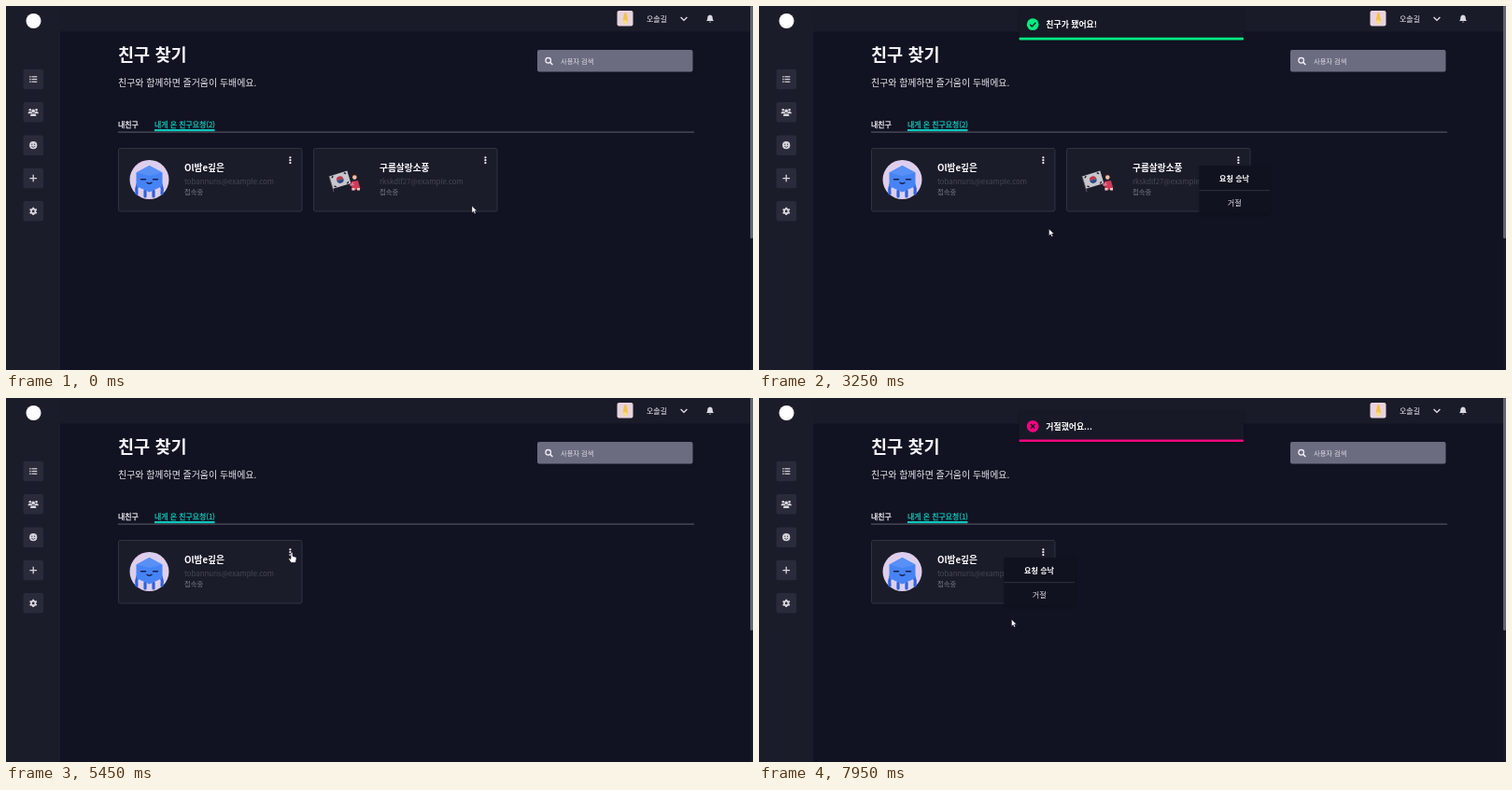
Recreate the animation shown at these times as an HTML page. Size 800x390 px, loop 8 s.

```html
<!DOCTYPE html>
<html lang="ko">
<head>
<meta charset="utf-8">
<title>친구 찾기</title>
<style>
html, body { margin: 0; width: 100%; height: 100%; overflow: hidden; background: #111322; }
svg { display: block; width: 100vw; height: 100vh; }
text { font-family: "Noto Sans CJK KR", "Noto Sans CJK", "Noto Sans CJK JP", sans-serif; white-space: pre; }
.medium { stroke: currentColor; stroke-width: .25; }
</style>
</head>
<body>
<svg id="stage" viewBox="0 0 800 390" xmlns="http://www.w3.org/2000/svg"></svg>
<script>
const LOOP = 8000;
const WHITE = '#f4f4f8', TEAL = '#10c6ba';

const text = (x, y, size, str, fill = WHITE, weight = 400, extra = '') =>
  `<text x="${x}" y="${y}" font-size="${size}" fill="${fill}" color="${fill}" font-weight="${weight}" ${extra}>${str}</text>`;
const rect = (x, y, w, h, fill, r = 0, extra = '') =>
  `<rect x="${x}" y="${y}" width="${w}" height="${h}" rx="${r}" fill="${fill}" ${extra}/>`;
const circle = (x, y, r, fill, extra = '') => `<circle cx="${x}" cy="${y}" r="${r}" fill="${fill}" ${extra}/>`;
const path = (d, fill, extra = '') => `<path d="${d}" fill="${fill}" ${extra}/>`;
const line = (d, stroke, width, extra = '') =>
  `<path d="${d}" fill="none" stroke="${stroke}" stroke-width="${width}" ${extra}/>`;
const at = (x, y, body, id = '') => `<g ${id && `id="${id}"`} transform="translate(${x} ${y})">${body}</g>`;

// Sidebar icons, drawn around their centre
const ICON = '#d6d6dc', TILE = '#2a2b3a';
const person = (x, y, r) =>
  circle(x, y, r, ICON) + path(`M${x - r * 1.7} ${y + r * 3}v-.6q0-${r * 1.2} ${r * 1.7}-${r * 1.2}t${r * 1.7} ${r * 1.2}v.6z`, ICON);
const icons = [
  [-2.7, 0, 2.7].map(y => rect(-4, y - .7, 1.4, 1.4, ICON) + rect(-1.7, y - .6, 5.8, 1.2, ICON)).join(''),
  person(-3.4, -2.6, 1.3) + person(3.4, -2.6, 1.3) + person(0, -1.4, 1.85),
  circle(0, 0, 4.1, ICON) + circle(-1.4, -1, .6, TILE) + circle(1.4, -1, .6, TILE) +
    line('M-2 1.1Q0 3.3 2 1.1', TILE, .8),
  line('M-3.8 0H3.8M0-3.8V3.8', ICON, 1.3),
  [0, 60, 120].map(a => rect(-1, -4.2, 2, 8.4, ICON, .4, `transform="rotate(${a})"`)).join('') +
    circle(0, 0, 3.1, ICON) + circle(0, 0, 1.3, TILE)
];
const sidebar = rect(0, 0, 58, 390, '#1b1c2a') + circle(29.5, 16, 8, '#fff') +
  icons.map((icon, i) => {
    const y = 78.5 + i * 35.35;
    return rect(18.5, y - 10.8, 21.5, 21.5, TILE, 2) + at(29.2, y, icon);
  }).join('');

const header = rect(58, 0, 742, 27.5, '#1a1b29') +
  rect(654.5, 5, 17, 16.5, '#e9d3df', 2) +
  path('M662 8q1.5-2 2.6 0l1.5 8q-2.6 4-5.4 0z', '#f4c24c') + circle(663.3, 17.3, 2.4, '#f7dc8b') +
  text(686, 16.6, 8, '오솔길') +
  line('M722.6 12L726 15.4L729.4 12', '#e4e4ea', 1.3) +
  path('M750 16.1q1.3-1.2 1.3-3.3q0-2.7 2.7-3.2q2.7.5 2.7 3.2q0 2.1 1.3 3.3zM752.9 16.7h2.2q-1.1 1.7-2.2 0z', '#d9d9df');

const content = text(120, 58.6, 18.6, '친구 찾기', WHITE, 700) +
  text(120, 86, 9.95, '친구와 함께하면 즐거움이 두배에요.', '#e6e6ec') +
  rect(569, 47, 166.5, 23.5, '#6b6c80', 2) +
  circle(580.7, 58.3, 2.8, 'none', 'stroke="#ececf2" stroke-width="1.3"') +
  line('M582.8 60.4L585.4 63', '#ececf2', 1.5) +
  text(594, 61.8, 7.25, '사용자 검색', '#dcdce4') +
  rect(120, 134.6, 617, 1, '#5f616d') +
  text(120, 130, 7.95, '내친구', WHITE, 400, 'class="medium"') +
  text(159, 130, 7.9, '', TEAL, 400, 'id="tab" class="medium"') +
  rect(159, 132, 64.5, 2.2, TEAL) +
  rect(797, 0, 3, 390, '#171827') + rect(797, 0, 3, 249, '#646573', 1);

const hexFace = circle(33.5, 34, 21, '#dccfee') +
  [[20, 24], [46, 20], [50, 32], [18, 40], [26, 17]].map(([x, y]) => circle(x, y, 1.5, '#f0c9dc')).join('') +
  line('M21 39q-2 5-1 10M46 39q2 5 1 10M29 46v6M38 46v6', '#2f62d8', 3.2, 'stroke-linecap="round"') +
  path('M33.5 19L47.5 26.5V41L33.5 47.5L19.5 41V26.5Z', '#4683f5') +
  path('M33.5 19L47.5 26.5L33.5 30L19.5 26.5Z', '#5890f8') +
  line('M24.5 33.8h5M37.5 33.8h5M31 37.3q2.5 2 5 0', '#17214e', 1.4, 'stroke-linecap="round"');

const flagGirl = `<g transform="rotate(-17 28 35)">` + rect(19, 27.5, 20, 14, '#c6c6cd') +
  path('M25.2 34.5a3.8 3.8 0 0 1 7.6 0z', '#b8384a') + path('M25.2 34.5a3.8 3.8 0 0 0 7.6 0z', '#2b4a84') +
  line('M21 30l2-1.6M35 28.5l2 1.6M21 39l2 1.6M35 40.6l2-1.6', '#222', 1.4) + '</g>' +
  line('M17 30l5 17', '#77777f', .7) +
  path('M41 36l7-1l2.5 9l-9 1.5z', '#cf3b58') + path('M39 39l4-2l1 3l-4 1z', '#e0728a') +
  circle(44.3, 30.5, 3.4, '#2c1b20') + circle(44.3, 31.6, 2.3, '#edc3a8') +
  path('M41.5 43h3v2.5h-3zM47 43h3v2.5h-3z', '#e7c9c0');

const card = (x, id, avatar, name, mail) => at(x, 152,
  rect(.5, .5, 196.5, 67.5, '#1b1c2a', 2, 'stroke="#313240"') + avatar +
  text(71, 25.3, 9.7, name, '#fff', 700) +
  text(71, 38.6, 7.8, mail, '#464755') +
  text(71, 49.7, 7.3, '접속중', '#777885') +
  [10.3, 13.2, 16.1].map(y => circle(184.4, y, 1.15, '#f0f0f4')).join(''), id);

// Menu origin is its top left corner
const menu = at(0, 0,
  rect(0, 0, 75.5, 51.5, '#10121f', 1, 'filter="url(#shade)"') +
  rect(0, 6, 75, 15, TILE, 0, 'id="row0"') +
  rect(0, 32, 75, 15, TILE, 0, 'id="row1"') +
  rect(0, 26, 75.5, .9, '#333543') +
  text(37.5, 16.6, 8.1, '요청 승낙', '#fff', 700, 'text-anchor="middle"') +
  text(37.7, 42.5, 8.1, '거절', '#e2e2e8', 400, 'text-anchor="middle"'), 'menu');

const toast = (id, color, mark, msg) => at(0, 0,
  rect(278.5, 14, 240.5, 33, '#171926', 1.5, 'filter="url(#shade)"') +
  rect(278.5, 44.4, 240.5, 2.6, color, 1) +
  circle(293.2, 30.3, 6.4, color) + line(mark, '#171926', 1.4) +
  text(307.3, 34, 8.9, msg, '#fff', 700), id);

const cursors =
  at(0, 0, path('M0 0V7.2L1.7 5.7L2.8 8.3L4.1 7.7L3 5.2H5.2Z', '#fff', 'stroke="#15161f" stroke-width=".4"'), 'arrow') +
  at(0, 0, path('M-1 .6Q0-.6 1 .6V4.2L4.4 5.1Q5.3 5.6 5 7L4.2 11H-.8L-3.3 7.2Q-3.2 5.8-1 7.2Z', '#fff', 'stroke="#15161f" stroke-width=".6"'), 'hand');

document.getElementById('stage').innerHTML =
  `<defs><filter id="shade" x="-20%" y="-30%" width="140%" height="160%" color-interpolation-filters="sRGB">
    <feDropShadow dx="0" dy="1" stdDeviation="1.5" flood-color="#000" flood-opacity=".25"/></filter></defs>` +
  rect(0, 0, 800, 390, '#111322') + header + sidebar + content +
  card(120, 'card0', hexFace, 'Ol밤e깊은', 'tobannuris@example.com') +
  card(329, 'card1', flagGirl, '구름살랑소풍', 'rkskdlf27@example.com') + menu +
  toast('accepted', '#04ee82', 'M290.2 30.4L292.4 32.6L296.4 28.4', '친구가 됐어요!') +
  toast('declined', '#f0057f', 'M291 28.1L295.4 32.5M295.4 28.1L291 32.5', '거절했어요...') + cursors;

const el = {};
document.querySelectorAll('#stage [id]').forEach(node => { el[node.id] = node; });
const show = (id, on) => { el[id].style.display = on ? '' : 'none'; };
const move = (id, x, y) => el[id].setAttribute('transform', `translate(${x} ${y})`);

// cubic-bezier(.215, .61, .355, 1)
function easeOut(p) {
  const bez = (a, b, s) => 3 * a * s * (1 - s) ** 2 + 3 * b * s * s * (1 - s) + s ** 3;
  let lo = 0, hi = 1;
  for (let i = 0; i < 24; i++) {
    const mid = (lo + hi) / 2;
    if (bez(.215, .355, mid) < p) lo = mid; else hi = mid;
  }
  return bez(.61, 1, lo);
}
const smooth = p => p * p * (3 - 2 * p);

// Interpolates rows of [time, ...values]
function follow(keys, t, ease) {
  if (t <= keys[0][0]) return keys[0].slice(1);
  const i = keys.findIndex(k => k[0] > t);
  if (i < 0) return keys[keys.length - 1].slice(1);
  const a = keys[i - 1], b = keys[i], p = ease((t - a[0]) / (b[0] - a[0]));
  return a.slice(1).map((v, n) => v + (b[n + 1] - v) * p);
}

const POINTER = [
  [0, 499, 214.3], [250, 499, 214.3], [750, 516, 165], [1300, 516, 165], [1650, 518, 185.3],
  [2850, 518, 185.3], [3350, 287, 245], [3650, 280.3, 247.8], [3900, 276, 272], [4350, 306, 165.3],
  [5550, 306, 165.3], [5950, 306, 210], [6050, 306, 213.4], [7300, 306, 213.4], [7700, 294, 233], [7950, 270.5, 237.3]
];
const BOUNCE = [[0, -1250], [.6, 10.4], [.75, -4.2], [.9, 2.1], [1, 0]];
const TOAST_MS = 700, ACCEPT = 2920, DECLINE = 6625;
const OPEN_1 = 950, REFRESH = 4700, OPEN_2 = 5490;

function drop(id, start, end, t) {
  show(id, t >= start && t < end);
  move(id, 0, follow(BOUNCE, (t - start) / TOAST_MS, easeOut)[0]);
}

function render(t) {
  const [x, y] = follow(POINTER, t, smooth);
  const refreshed = t >= REFRESH;
  const open = refreshed ? t >= OPEN_2 : t >= OPEN_1;
  const left = refreshed ? 262.5 : 471.5, top = 171.2;
  const inMenu = open && x > left && x < left + 75;
  const over = row => inMenu && y > top + 6 + row * 26 && y < top + 21 + row * 26;
  const onDots = Math.abs(x - left - 42) < 5 && Math.abs(y - 165.2) < 6;
  const hand = over(0) || over(1) || onDots;

  el.tab.textContent = `내게 온 친구요청(${refreshed ? 1 : 2})`;
  show('card1', !refreshed);
  show('menu', open);
  move('menu', left, top);
  show('row0', over(0));
  show('row1', over(1));
  drop('accepted', ACCEPT, REFRESH, t);
  drop('declined', DECLINE, LOOP, t);
  show('hand', hand);
  show('arrow', !hand);
  move(hand ? 'hand' : 'arrow', x, y);
}

const begin = performance.now();
function tick() {
  render((performance.now() - begin) % LOOP);
  requestAnimationFrame(tick);
}
tick();
</script>
</body>
</html>
```
